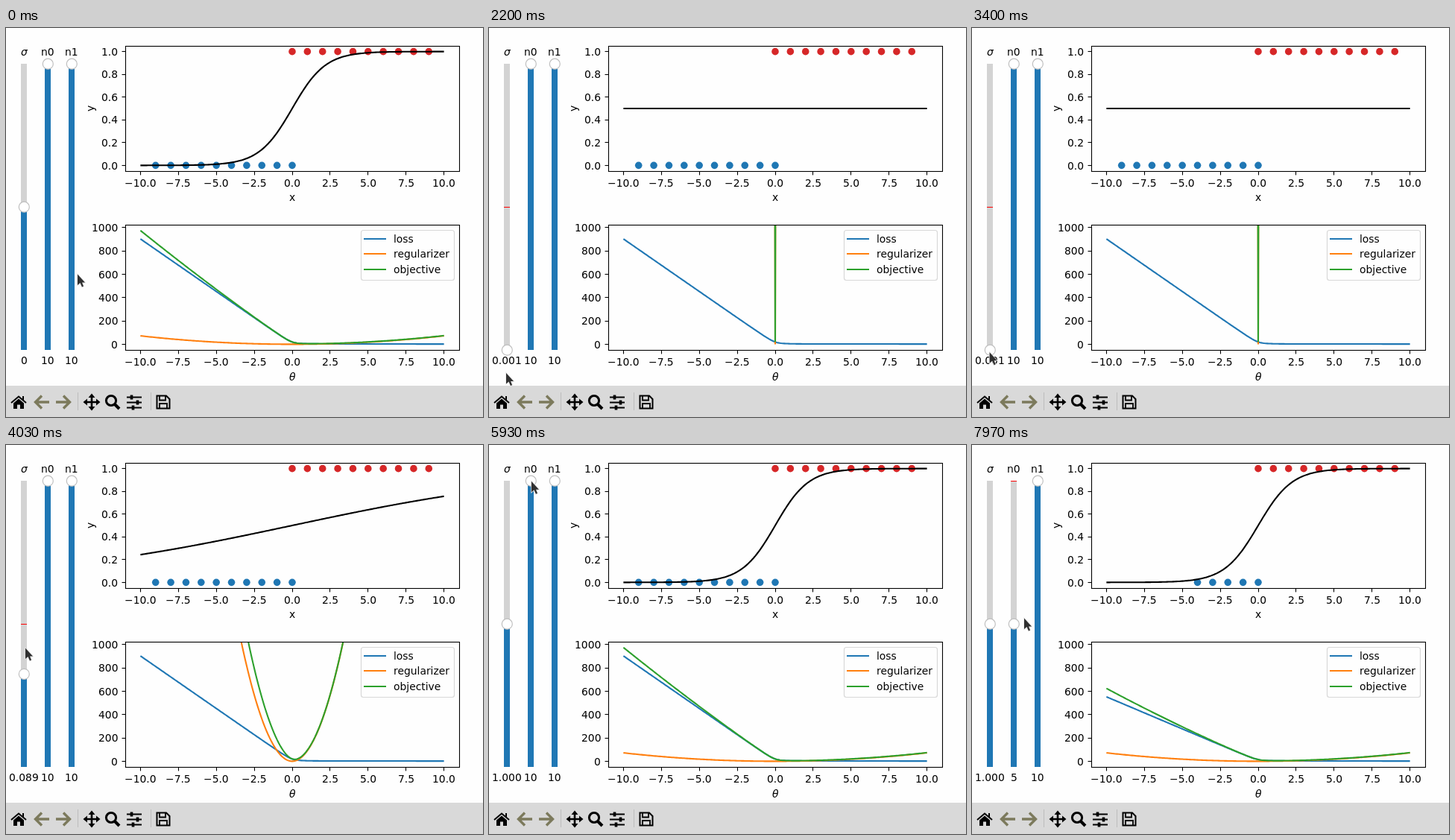
Write an HTML page with a canvas that moves like this. It is 640x522 px and loops after 8000 ms.

```html
<!DOCTYPE html>
<html lang="en">
<head>
<meta charset="utf-8">
<title>Regularized logistic regression</title>
<style>
  html, body { margin: 0; width: 100%; height: 100%; overflow: hidden; background: #fefefe; }
  canvas { display: block; width: 640px; height: 522px; }
</style>
</head>
<body>
<canvas id="stage" width="640" height="522"></canvas>
<script>
const ctx = document.getElementById('stage').getContext('2d');
const LOOP = 8000, FPS = 30, LAG = 50, PRESS = 1400, RELEASE = 4700;
const BG = '#fefefe', BAR = '#d9d9d9', TRACK = '#d3d3d3', EDGE = '#bfbfbf', INK = '#000';
const BLUE = '#1f77b4', ORANGE = '#ff7f0e', GREEN = '#2ca02c', RED = '#d62728';
const FONT = '13.89px "DejaVu Sans", sans-serif';

// Pointer path: time, x, y
const path = [
  [0, 95, 329], [30, 95, 329], [800, 24, 238], [1300, 24, 243], [1420, 24, 242], [1470, 23, 226],
  [1690, 23, 18], [2150, 22, 478], [2590, 22, 17], [2950, 21, 232], [3000, 21, 265],
  [3260, 22, 434], [3700, 24, 432], [3980, 25, 307.2], [4030, 25, 271], [4420, 26, 17],
  [4700, 28, 240], [4900, 30, 237], [5170, 30, 237], [5950, 56, 47], [6450, 56, 49],
  [6830, 56, 97], [7970, 69, 231], [8000, 69, 233]
];

const slope = (i, k) => (path[i + 1][k] - path[i][k]) / (path[i + 1][0] - path[i][0]);

// Monotone tangent: flat at turning points, harmonic mean elsewhere
function tangent(i, k) {
  if (i === 0 || i === path.length - 1) return 0;
  const a = slope(i - 1, k), b = slope(i, k);
  return a * b <= 0 ? 0 : 2 * a * b / (a + b);
}

function pointer(t, k) {
  let i = 0;
  while (i < path.length - 2 && path[i + 1][0] <= t) i++;
  const d = path[i + 1][0] - path[i][0], u = Math.max(0, (t - path[i][0]) / d), v = 1 - u;
  return v * v * (1 + 2 * u) * path[i][k] + u * u * (3 - 2 * u) * path[i + 1][k]
    + d * u * v * (v * tangent(i, k) - u * tangent(i + 1, k));
}

const clamp = (v, lo, hi) => Math.min(hi, Math.max(lo, v));

function model(t) {
  const late = t - LAG;
  const handle = late < PRESS ? 240 : clamp(pointer(Math.min(late, RELEASE), 2), 48, 432);
  const sigma = 10 ** ((240 - handle) / 64);
  const n0 = late < 6450 ? 10 : clamp(Math.round((432 - pointer(late, 2)) / 38.4), 0, 10);
  return { handle, sigma, n0, n1: 10, label: late < PRESS ? '0' : sigma.toFixed(3) };
}

function sum(n, f) {
  let s = 0;
  for (let i = 0; i < n; i++) s += f(i);
  return s;
}

function bestTheta({ sigma, n0, n1 }) {
  let lo = 0, hi = 40;
  for (let k = 0; k < 45; k++) {
    const w = (lo + hi) / 2, pull = i => i / (1 + 2 ** (w * i));
    if (w / (Math.LN2 * sigma * sigma) < sum(n0, pull) + sum(n1, pull)) lo = w; else hi = w;
  }
  return lo;
}

// Text starts on whole pixels; align is the share of its width left of x
function text(s, x, y, align = 0.5, style = '') {
  ctx.font = style + FONT;
  ctx.fillStyle = INK;
  ctx.fillText(s, Math.round(x - align * ctx.measureText(s).width), Math.round(y));
}

function line(points, color, width) {
  ctx.beginPath();
  points.forEach(([x, y]) => ctx.lineTo(x, y));
  ctx.strokeStyle = color;
  ctx.lineWidth = width;
  ctx.stroke();
}

function disc(x, y, r, color) {
  ctx.beginPath();
  ctx.arc(x, y, r, 0, 2 * Math.PI);
  ctx.fillStyle = color;
  ctx.fill();
}

function rect(x, y, w, h, color) {
  ctx.fillStyle = color;
  ctx.fillRect(x, y, w, h);
}

const px = x => 384 + 20.364 * x;
const py = y => 184.36 - 152.73 * y;
const pv = v => 424.4 - 0.1567 * v;
const snap = v => Math.floor(v) + 0.5;

function curve(f, toY, color) {
  const points = [];
  for (let k = 0; k <= 200; k++) {
    const x = -10 + k / 10;
    points.push([px(x), toY(f(x))]);
  }
  line(points, color, 2.08);
}

function clipped(top, draw) {
  ctx.save();
  ctx.beginPath();
  ctx.rect(160, top, 448, 168);
  ctx.clip();
  draw();
  ctx.restore();
}

function axes(top, ticks, toY, format) {
  for (let x = -10; x <= 10; x += 2.5) {
    const X = snap(px(x));
    line([[X, top + 168], [X, top + 173.4]], INK, 1.1);
    text(x.toFixed(1).replace('-', '\u2212'), px(x), top + 189);
  }
  for (const v of ticks) {
    const Y = snap(toY(v));
    line([[155.5, Y], [160, Y]], INK, 1.1);
    text(format(v), 150.3, toY(v) + 5.2, 1);
  }
  ctx.strokeStyle = INK;
  ctx.lineWidth = 1.1;
  ctx.strokeRect(160.5, top + 0.5, 448, 168);
}

function slider(x, handle, initial, name, value, style) {
  rect(x - 4, 48, 8, 384, TRACK);
  rect(x - 4, handle, 8, 432 - handle, BLUE);
  rect(x - 4, initial, 8, 1, '#f00');
  disc(x + 0.3, handle + 0.2, 7, '#fff');
  ctx.strokeStyle = EDGE;
  ctx.lineWidth = 1.2;
  ctx.stroke();
  text(name, x, 37, 0.5, style);
  text(value, x, 451);
}

function legend() {
  ctx.beginPath();
  ctx.roundRect(476.5, 271.5, 125, 67, 3);
  ctx.fillStyle = BG;
  ctx.fill();
  ctx.strokeStyle = '#d8d8d8';
  ctx.lineWidth = 1.2;
  ctx.stroke();
  [['loss', BLUE], ['regularizer', ORANGE], ['objective', GREEN]].forEach(([name, color], i) => {
    const y = Math.round(283 + 20.4 * i);
    line([[480, y], [510, y]], color, 2);
    text(name, 520, y + 5, 0);
  });
}

const shape = (d, color = INK) => { ctx.fillStyle = color; ctx.fill(new Path2D(d), 'evenodd'); };
const trace = (d, width, color = INK) => {
  ctx.strokeStyle = color;
  ctx.lineWidth = width;
  ctx.stroke(new Path2D(d));
};

function toolbar() {
  rect(0, 480, 640, 42, BAR);
  shape('M10 503.500L17 497.500L24 503.500V511H19V505.500H15V511H10Z');
  trace('M7 503L17 494.500L27 503M23 494V499', 2);
  const dim = '#7c7a5c';
  trace('M58 502H41M48 493.500L39.500 502L48 510.500', 3.4, dim);
  trace('M67 502H84M77 493.500L85.500 502L77 510.500', 3.4, dim);
  trace('M96.500 489V513M194.500 489V513', 1, '#bcbcbc');
  trace('M115 494V510M107 502H123', 2.6);
  shape('M115 490.500L119.500 496H110.500ZM115 513.500L119.500 508H110.500ZM103.500 502L109 497.500V506.500ZM126.500 502L121 497.500V506.500Z');
  ctx.beginPath();
  ctx.arc(141, 500, 6.6, 0, 2 * Math.PI);
  ctx.lineWidth = 3;
  ctx.strokeStyle = INK;
  ctx.stroke();
  trace('M146 505L152 511', 4);
  trace('M162 495.500H182M162 502.500H182M162 509.500H182', 1.8);
  trace('M168.500 492.500V498.500M176.500 499.500V505.500M170.500 506.500V512.500', 3.6);
  trace('M202.500 493.500H215L219.500 498V510.500H202.500Z', 2);
  trace('M206 494V499.500H214V494M206 510V504H216V510', 1.8);
}

function arrow(x, y) {
  ctx.save();
  ctx.translate(x + 0.5, y + 1);
  const d = 'M0.500 0.500V15L4 12L6.500 17.500L8.500 16.500L6.500 11.500H10.500Z';
  trace(d, 1.4, '#e4e4e4');
  shape(d, '#303030');
  ctx.restore();
}

function draw(t) {
  const m = model(t), theta = bestTheta(m);
  rect(0, 0, 640, 522, BG);

  clipped(24, () => {
    for (let i = 0; i < m.n0; i++) disc(px(-i), py(0), 4.8, BLUE);
    for (let i = 0; i < m.n1; i++) disc(px(i), py(1), 4.8, RED);
    curve(x => 1 / (1 + 2 ** (-theta * x)), py, INK);
  });
  axes(24, [0, 0.2, 0.4, 0.6, 0.8, 1], py, v => v.toFixed(1));
  text('x', 384, 231.5);
  ctx.save();
  ctx.translate(118, 108);
  ctx.rotate(-Math.PI / 2);
  text('y', 0, 0);
  ctx.restore();

  const bits = w => i => Math.log2(1 + 2 ** (-w * i));
  const loss = w => sum(m.n0, bits(w)) + sum(m.n1, bits(w));
  const penalty = w => w * w / (2 * Math.LN2 * m.sigma ** 2);
  clipped(264, () => {
    curve(loss, pv, BLUE);
    curve(penalty, pv, ORANGE);
    curve(w => loss(w) + penalty(w), pv, GREEN);
  });
  axes(264, [0, 200, 400, 600, 800, 1000], pv, String);
  text('θ', 384, 473, 0.5, 'italic ');
  legend();

  slider(24, m.handle, 240, 'σ', m.label, 'italic ');
  slider(56, 432 - 38.4 * m.n0, 48, 'n0', m.n0, '');
  slider(88, 432 - 38.4 * m.n1, 48, 'n1', m.n1, '');
  toolbar();
  arrow(pointer(t, 1), pointer(t, 2));
}

function frameTime(t) {
  const frame = Math.floor(t * FPS / 1000 + 0.15);
  return Math.round(frame * 100 / FPS) * 10;
}

const start = performance.now();
function tick() {
  draw(frameTime((performance.now() - start) % LOOP));
  requestAnimationFrame(tick);
}
tick();
</script>
</body>
</html>
```
